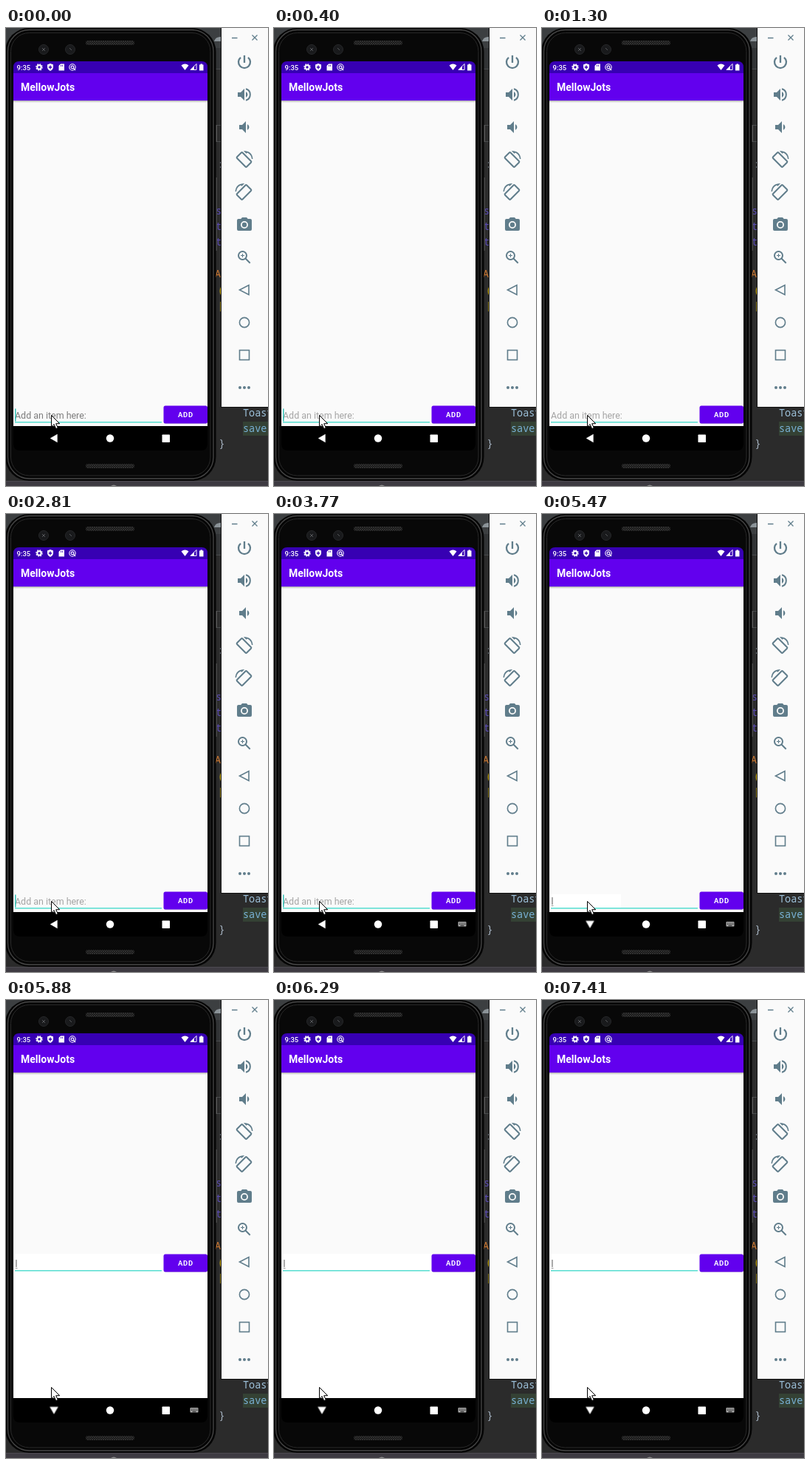
Animation of 355 by 619 pixels, one loop 8 s. Source, as an HTML page:

```html
<!DOCTYPE html>
<html lang="en">
<head>
<meta charset="utf-8">
<title>Phone emulator</title>
<style>
html, body { margin: 0; width: 100%; height: 100%; overflow: hidden; background: #2b2b2b; }
svg { display: block; width: 355px; height: 619px; }
text { font-family: Roboto, sans-serif; white-space: pre; }
.code text { font: 13.5px "Noto Sans Mono", monospace; }
.tools { fill: #607d8b; }
.line { fill: none; stroke: #607d8b; stroke-width: 2; }
#back { transform-origin: 65px 554.5px; }
</style>
</head>
<body>
<svg viewBox="0 0 355 619" xmlns="http://www.w3.org/2000/svg">
  <defs>
    <pattern id="mesh" width="3" height="3" patternUnits="userSpaceOnUse">
      <rect width="3" height="3" fill="#151515"/>
      <path d="M0 0L3 3M3 0L0 3" stroke="#3c3c3c" stroke-width=".7"/>
    </pattern>
    <linearGradient id="shade" x2="0" y2="1">
      <stop stop-color="#000" stop-opacity=".3"/>
      <stop offset="1" stop-color="#000" stop-opacity="0"/>
    </linearGradient>
  </defs>

  <!-- editor behind the emulator -->
  <g class="code">
    <rect width="355" height="619" fill="#2b2b2b"/>
    <rect y="0" width="292" height="27" fill="#3c3f41"/>
    <path d="M282 18q2-7 10-6v6z" fill="#8b9398"/>
    <rect x="284" y="27" width="8" height="28" fill="#313335"/>
    <path d="M284 55.500h8M284 131.500h8M284 153.500h8" stroke="#484a4c"/>
    <rect x="321" y="532" width="34" height="19" fill="#344134"/>
    <text x="321" y="525" fill="#9fc3dc">Toast</text>
    <text x="321" y="546" fill="#79b2d6">saveI</text>
    <text x="288.500" y="566" fill="#a9b7c6">}</text>
    <g fill="#5b4bb5">
      <text x="284" y="252">s</text><text x="284" y="273">t</text><text x="284" y="294">t</text>
    </g>
    <text x="283" y="337" fill="#cc7832">A</text>
    <text x="287" y="359" fill="#d5b400">(</text>
    <text x="287" y="380" fill="#b39b20">[</text>
    <text x="287" y="189" fill="#a9b7c6">:</text>
    <rect y="612" width="355" height="7" fill="#3e3b42"/>
    <path d="M0 612.500h355" stroke="#4c4950"/>
    <path d="M142 619q4-3 8 0" fill="#8a8a8a"/>
  </g>

  <!-- phone body -->
  <rect x="284" y="131" width="2" height="23" fill="#5a5a5a"/>
  <rect x="284" y="202" width="2" height="99" fill="#4a4a4a"/>
  <rect x="-1" y="0" width="285.500" height="612" rx="32" fill="#050505"/>
  <rect x="2.500" y="2.500" width="278.500" height="606.500" rx="29" fill="none" stroke="#484848" stroke-width="1.300"/>
  <rect x="6.500" y="6.500" width="270.500" height="598.500" rx="25" fill="#080808" stroke="#2a2a2a"/>
  <rect x="108" y="17" width="66" height="6" rx="3" fill="url(#mesh)"/>
  <rect x="108" y="589" width="66" height="6" rx="3" fill="url(#mesh)"/>
  <g fill="#191a1c" stroke="#27282a">
    <circle cx="51" cy="29" r="6.500"/><circle cx="87" cy="29" r="6.500"/>
  </g>
  <path d="M49 27l4 4M53 27l-4 4M86 27l3 3" stroke="#55575a"/>

  <!-- screen -->
  <path d="M10 61v-8q0-8 8-8h247q8 0 8 8v8z" fill="#3700b3"/>
  <rect x="10" y="98" width="263" height="440" fill="#fafafa"/>
  <rect x="10" y="61" width="263" height="37" fill="#6200ee"/>
  <rect x="10" y="98" width="263" height="3" fill="url(#shade)"/>
  <path d="M10 538h263v24q0 9-9 9H19q-9 0-9-9z" fill="#000"/>
  <g fill="#fff">
    <text x="14.500" y="56.500" font-size="9.500" font-weight="500">9:35</text>
    <circle cx="45" cy="53" r="2.700" fill="none" stroke="#fff" stroke-width="2"/>
    <circle cx="45" cy="53" r="4.200" fill="none" stroke="#fff" stroke-width="1.200" stroke-dasharray="1.700 1.600"/>
    <path d="M60 48l4 1.600v3.200q0 3.400-4 5.200q-4-1.800-4-5.200v-3.200z"/>
    <path d="M60 50.500v5M57.800 53h4.400" stroke="#3700b3" stroke-width="1.300"/>
    <path d="M74 48.500h5v9h-7.500v-6.500z"/>
    <path d="M74.500 50v2M76.500 50v2" stroke="#3700b3" stroke-width=".8"/>
    <circle cx="90" cy="53" r="4.200" fill="none" stroke="#fff" stroke-width="1.100"/>
    <circle cx="90" cy="53" r="1.900" fill="none" stroke="#fff" stroke-width="1.100"/>
    <path d="M91 54l3 3" stroke="#fff" stroke-width="1.200"/>
    <path d="M237.500 50.500q5-4 10 0l-5 6.500z"/>
    <path d="M250 56.500l8-8v8z" fill="none" stroke="#fff"/>
    <path d="M250 56.500l5-5v5z"/>
    <path d="M262 49.500h1.500v-1h2.500v1h1.500v8H262z"/>
    <text x="20" y="84.500" font-size="14" font-weight="700">MellowJots</text>
  </g>

  <!-- input row -->
  <rect id="fresh" x="12" y="343" width="261" height="195" fill="#fff" opacity="0"/>
  <g id="row">
    <rect id="wipe" x="12" y="514" width="95" height="18" fill="#fff" opacity="0"/>
    <text id="hint" x="12" y="527.500" font-size="12.450">Add an item here:</text>
    <g id="typed" opacity="0">
      <text x="12.500" y="528" font-size="12" fill="#666">l</text>
      <path d="M12.800 529.500h2.700" stroke="#999"/>
    </g>
    <rect id="caretA" x="12" y="514.500" width="1.500" height="17" fill="#35c4b8"/>
    <rect id="caretB" x="15.200" y="514.500" width="1.500" height="17" fill="#35c4b8" opacity="0"/>
    <rect x="12" y="532" width="199" height="1.600" fill="#5fdfd3"/>
    <rect x="214" y="511.500" width="59" height="23.500" rx="2.500" fill="#000" opacity=".15"/>
    <rect x="213.500" y="510.500" width="59.500" height="24" rx="2.500" fill="#6200ee"/>
    <text x="233" y="526" font-size="9.500" font-weight="700" letter-spacing=".7" fill="#fff">ADD</text>
  </g>

  <!-- navigation bar -->
  <g fill="#fff">
    <path id="back" d="M60 554.500l9.500-5.500v11z" stroke="#fff" stroke-width=".3" stroke-linejoin="round"/>
    <circle cx="141" cy="554.500" r="5.200"/>
    <rect x="211.500" y="549.500" width="10.500" height="10.500" rx=".8"/>
  </g>
  <g id="keys" opacity="0">
    <rect x="249.500" y="551" width="11" height="6.500" rx=".8" fill="#a8a8a8"/>
    <path d="M251 552.800h8.500M251 554.500h8.500" stroke="#111" stroke-dasharray="1 .9"/>
    <path d="M252.500 556.300h5" stroke="#111" stroke-width=".9"/>
  </g>

  <!-- emulator toolbar -->
  <rect x="291" y="0" width="64" height="513" fill="#111"/>
  <rect x="292" y="0" width="63" height="512" fill="#fafafa"/>
  <path class="line" d="M306 13.500h7.500M333.500 9.500l7 7M340.500 9.500l-7 7" style="stroke-width:1.300"/>
  <g class="tools">
    <g transform="translate(311 34)" class="line">
      <path d="M12 3v10M7 5.800a8 8 0 1 0 10 0" style="stroke-width:2.300"/>
    </g>
    <g transform="translate(311 78)">
      <path d="M3 9v6h4l5 5V4L7 9zM14 8q2.500 1.400 2.500 4T14 16z"/>
      <path class="line" d="M14 4.300a8 8 0 0 1 0 15.400"/>
    </g>
    <path transform="translate(311 122)" d="M5 9v6h4l5 5V4L9 9zM16 8q2.500 1.400 2.500 4T16 16z"/>
    <g id="turn">
      <rect class="line" x="-9.300" y="-5.300" width="18.600" height="10.600" rx="1.200" transform="rotate(45)"/>
      <path d="M4.500-9.500q5.500 2.700 6 8.500H12Q11-12-.7-12l3.800 3.800z"/>
    </g>
    <path transform="translate(311 254)" fill-rule="evenodd" d="M9 2L7.200 4H4q-2 0-2 2v12q0 2 2 2h16q2 0 2-2V6q0-2-2-2h-3.200L15 2zM12 7a5 5 0 1 1 0 10a5 5 0 1 1 0-10z"/>
    <circle cx="323" cy="266" r="3.200"/>
    <g transform="translate(311 298)" class="line">
      <circle cx="9.500" cy="9.500" r="5.500"/>
      <path d="M13.500 13.500l6.200 6.200"/>
      <path d="M7 9.500h5M9.500 7v5" style="stroke-width:1.100"/>
    </g>
    <g class="line" style="stroke-width:1.600">
      <path d="M316.500 354l12.500-6.500v13z"/>
      <circle cx="323" cy="398" r="6.600"/>
      <rect x="316.500" y="435.500" width="13" height="13"/>
    </g>
    <circle cx="317" cy="486" r="2"/><circle cx="323" cy="486" r="2"/><circle cx="329" cy="486" r="2"/>
  </g>

  <!-- mouse pointer -->
  <path d="M61.500 523.500v15.500l3.600-3.400l2.600 6l2.600-1.100l-2.600-5.800h5z" fill="#fff" stroke="#000"/>
</svg>
<script>
const LOOP = 8000;
const $ = id => document.getElementById(id);

// The second rotate button mirrors the first.
const mirror = $("turn").cloneNode(true);
mirror.removeAttribute("id");
mirror.setAttribute("transform", "translate(322.5 222) scale(-1 1)");
$("turn").setAttribute("transform", "translate(322.5 178)");
$("turn").after(mirror);

// Holds each value until the next step: [[ms, value], ...]
function hold(id, prop, steps) {
  const frames = steps.map(([ms, value]) =>
    ({ offset: ms / LOOP, [prop]: value, easing: "steps(1, end)" }));
  frames.push({ offset: 1, [prop]: steps[steps.length - 1][1] });
  $(id).animate(frames, { duration: LOOP, iterations: Infinity });
}

// Flips visibility at each given time.
function blink(id, shown, times) {
  hold(id, "opacity", [0, ...times].map((ms, i) => [ms, (i % 2 === 0) === shown ? 1 : 0]));
}

blink("caretA", true, [900, 1050, 1300, 1760, 2190, 2810, 3340, 3770, 4350, 4950, 5220]);
blink("caretB", false, [5220, 5470, 6010, 6290, 6820, 7410]);
blink("hint", true, [5220]);
blink("wipe", false, [5220]);
blink("typed", false, [5220]);
blink("fresh", false, [5880]);
blink("keys", false, [3090]);
hold("hint", "fill", [[0, "#7c7c7c"], [400, "#a4a4a4"]]);
hold("back", "transform", [[0, "rotate(0deg)"], [4200, "rotate(-45deg)"], [4350, "rotate(-90deg)"]]);
hold("row", "transform", [[0, "translateY(0px)"], [5880, "translateY(-167px)"]]);
</script>
</body>
</html>
```
